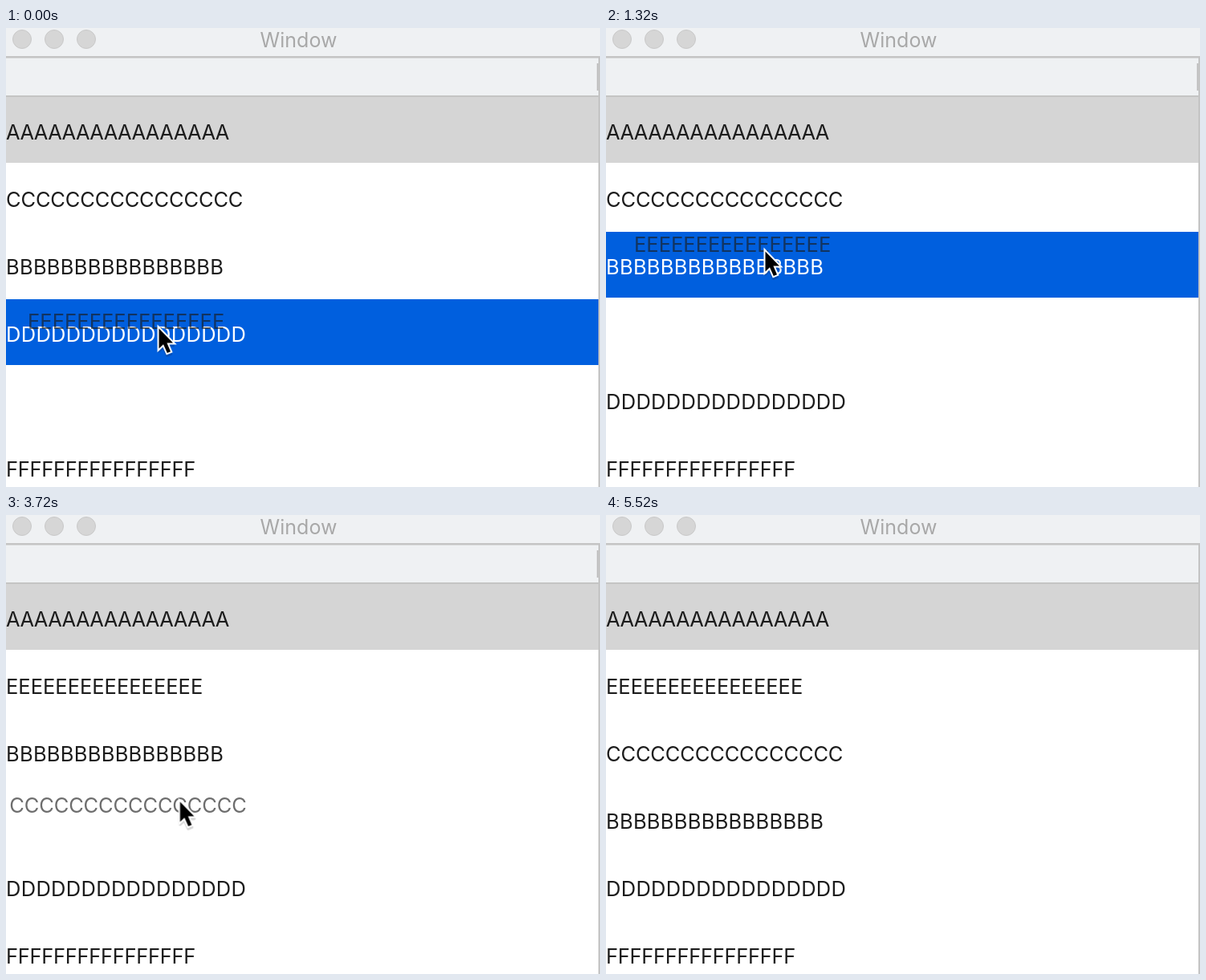
Animation of 740 by 572 pixels, one loop 5820 ms. Source, as an HTML page:

```html
<!DOCTYPE html>
<html lang="en">
<head>
<meta charset="utf-8">
<title>Window</title>
<style>
  html, body { margin: 0; width: 100%; height: 100%; overflow: hidden; background: #fff; }
  svg { display: block; width: 740px; height: 572px; }
  text { font: 400 25.5px Inter, "Liberation Sans", sans-serif; fill: #1c1c1c; }
  .title { font-size: 25px; fill: #a8a8a8; text-anchor: middle; }
  .lights circle { fill: #d6d6d6; stroke: #c9c9c9; }
  .bar { fill: #eff1f3; }
  .line { fill: #c4c4c4; }
  .mark { fill: #005fde; }
  .drag text { opacity: 0; }

  /* tracking per letter */
  .a { letter-spacing: -.58px; }
  .b { letter-spacing: .27px; }
  .c, .c1, .c2 { letter-spacing: -.17px; }
  .d { letter-spacing: .3px; }
  .f { letter-spacing: -.3px; }

  /* every animation shares the 5.82 s loop */
  .jump { animation: 5.82s step-end infinite; }
  .glide { animation: 5.82s ease-in-out infinite; }
  .f { transform: translateY(420px); }
  .b { animation-name: b-move; }
  .b text { animation-name: b-tint; }
  .c { animation-name: c-place; }
  .d { animation-name: d-move; }
  .d text { animation-name: d-tint; }
  .e { animation-name: e-move; }
  .e text { animation-name: e-tint; }
  .mark { animation-name: mark; }
  .handle { animation-name: handle; }
  .pointer { animation: pointer 5.82s linear infinite; }
  .drag .e1 { animation-name: lift-e; }
  .drag .c1 { animation-name: lift-c1; }
  .drag .c2 { animation-name: lift-c2; }

  /* rows are 84 px apart */
  @keyframes b-move {
    0%, 24.74% { transform: translateY(168px); }
    27.84%, 50.52% { transform: translateY(252px); }
    54.55%, 81.44% { transform: translateY(168px); }
    84.54%, 100% { transform: translateY(252px); }
  }
  @keyframes c-place {
    0% { transform: translateY(84px); opacity: 1; }
    41.24% { transform: translateY(84px); opacity: 0; }
    50.52% { transform: translateY(252px); opacity: 1; }
    61.86% { transform: translateY(252px); opacity: 0; }
    81.44%, 100% { transform: translateY(168px); opacity: 1; }
  }
  @keyframes d-move {
    0%, 2.06% { transform: translateY(252px); }
    5.15%, 100% { transform: translateY(336px); }
  }
  @keyframes e-move {
    0%, 45.36% { transform: translateY(168px); }
    48.45%, 100% { transform: translateY(84px); }
  }

  /* highlighted rows have white text */
  @keyframes b-tint {
    0%, 24.74%, 81.44%, 100% { fill: #1c1c1c; }
    9.28%, 67.01% { fill: #fff; }
  }
  @keyframes d-tint {
    0% { fill: #fff; }
    2.06%, 100% { fill: #1c1c1c; }
  }
  @keyframes e-tint {
    0% { fill: #1c1c1c; opacity: 0; }
    24.74%, 45.36%, 100% { fill: #1c1c1c; opacity: 1; }
    43.3% { fill: #fff; opacity: 1; }
  }
  @keyframes mark {
    0% { transform: translateY(252px); opacity: 1; }
    2.06%, 24.74%, 45.36%, 81.44%, 100% { transform: translateY(168px); opacity: 0; }
    9.28%, 43.3%, 67.01% { transform: translateY(168px); opacity: 1; }
  }
  @keyframes handle {
    0%, 41.24%, 61.86% { opacity: 1; }
    35.05%, 58.76%, 90.72%, 100% { opacity: 0; }
  }

  /* dragged labels follow the pointer */
  @keyframes lift-e {
    0% { opacity: .64; }
    24.74%, 100% { opacity: 0; }
  }
  @keyframes lift-c1 {
    0%, 50.52%, 100% { opacity: 0; }
    41.24% { opacity: .64; }
  }
  @keyframes lift-c2 {
    0%, 81.44%, 100% { opacity: 0; }
    61.86% { opacity: .64; }
  }
  @keyframes pointer {
    0% { transform: translate(189px, 372px); }
    5.15%, 7.22% { transform: translate(192px, 339px); }
    13.4% { transform: translate(195px, 306px); }
    17.53% { transform: translate(196px, 286px); }
    22.68%, 28.87% { transform: translate(197px, 276px); }
    40.21% { transform: translate(207px, 221px); }
    41.24% { transform: translate(208px, 218px); }
    45.36% { transform: translate(219px, 322px); }
    48.45%, 53.61% { transform: translate(222px, 289px); }
    60.82%, 61.86% { transform: translate(211px, 375px); }
    69.07% { transform: translate(226px, 305px); }
    80.41%, 86.6% { transform: translate(228px, 290px); animation-timing-function: ease-in; }
    94.3%, 100% { transform: translate(300px, -60px); }
  }
</style>
</head>
<body>
<svg viewBox="0 0 740 572">
  <rect class="bar" width="740" height="84"/>
  <rect class="line" y="35" width="740" height="2.5"/>
  <rect class="line" y="84" width="738" height="2"/>
  <g class="lights">
    <circle cx="20" cy="14" r="11.5"/>
    <circle cx="60" cy="14" r="11.5"/>
    <circle cx="100" cy="14" r="11.5"/>
  </g>
  <text class="title" x="364.5" y="24">Window</text>
  <rect y="86" width="738" height="82" fill="#d5d5d5"/>
  <rect class="line" x="738" y="37" width="2" height="535"/>
  <rect class="line handle jump" x="736" y="44" width="3" height="34"/>
  <rect class="mark jump" y="86" width="738" height="82"/>

  <g class="a"><text y="139">AAAAAAAAAAAAAAAA</text></g>
  <g class="b glide"><text class="jump" y="139">BBBBBBBBBBBBBBBB</text></g>
  <g class="c jump"><text y="139">CCCCCCCCCCCCCCCC</text></g>
  <g class="d glide"><text class="jump" y="139">DDDDDDDDDDDDDDDD</text></g>
  <g class="e glide"><text class="jump" y="139">EEEEEEEEEEEEEEEE</text></g>
  <g class="f"><text y="139">FFFFFFFFFFFFFFFF</text></g>

  <g class="pointer">
    <g class="drag">
      <text class="e1 jump" x="-162" y="3">EEEEEEEEEEEEEEEE</text>
      <text class="c1 jump" x="-208" y="5">CCCCCCCCCCCCCCCC</text>
      <text class="c2 jump" x="-211" y="16">CCCCCCCCCCCCCCCC</text>
    </g>
    <path d="M1.5 2.5V27.5L7 22.3L11.8 33L16 31.2L11.4 20.6H19Z" transform="translate(0 3)"
      fill="#000" opacity=".16" stroke="#000" stroke-width="4" stroke-linejoin="round"/>
    <path d="M1.5 2.5V27.5L7 22.3L11.8 33L16 31.2L11.4 20.6H19Z"
      fill="#000" stroke="#fff" stroke-width="4" paint-order="stroke"/>
  </g>
</svg>
</body>
</html>
```
